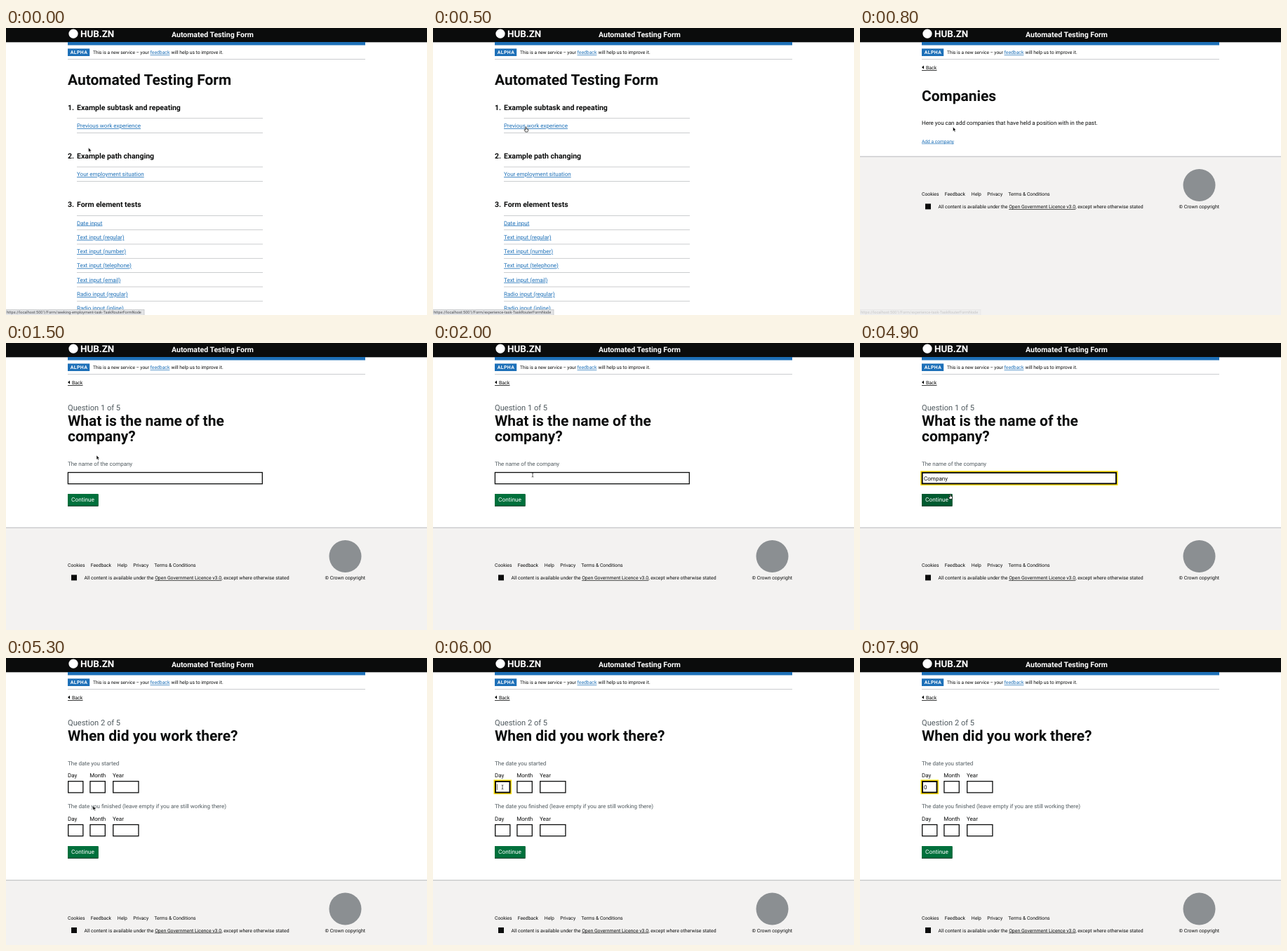
Animation, 600 px wide and 409 px high, one loop 8000 ms. Source, as an HTML page:

```html
<!DOCTYPE html>
<html lang="en">
<head>
<meta charset="utf-8">
<title>Form walkthrough</title>
<style>
html, body { margin: 0; width: 100%; height: 100%; overflow: hidden; background: #fff; }
svg { display: block; width: 100vw; height: 100vh; }
text { font-family: Roboto, "Open Sans", sans-serif; fill: #0b0c0c; text-rendering: geometricPrecision; white-space: pre; }
.b { font-weight: 700; }
.w { fill: #fff; }
.g { fill: #505a5f; }
.a { fill: #1d70b8; text-decoration: underline; text-decoration-thickness: .6px; }
.u { text-decoration: underline; text-decoration-thickness: .6px; }
.s { fill: #4a4c50; }
.alpha { letter-spacing: .4px; }
</style>
</head>
<body>
<svg id="stage" viewBox="0 0 600 409" xmlns="http://www.w3.org/2000/svg"></svg>
<script>
const LOOP = 8000, STEP = 100;
const H1 = 20.95, H2 = 10.5, BODY = 8.02, SMALL = 6.8;
const INK = '#0b0c0c', BLUE = '#1d70b8', LINE = '#bfc1c3';

const text = (x, y, size, str, cls = '', attrs = '') =>
  `<text x="${x}" y="${y}" font-size="${size}" class="${cls}" ${attrs}>${str}</text>`;
const rect = (x, y, w, h, fill, attrs = '') =>
  `<rect x="${x}" y="${y}" width="${w}" height="${h}" fill="${fill}" ${attrs}/>`;
const rule = (x, y, w) => rect(x, y, w, 0.8, LINE);
const group = (id, body) => `<g id="${id}">${body}</g>`;

const input = (x, y, w, h = 17.6) =>
  rect(x + 0.7, y + 0.7, w - 1.4, h - 1.4, '#fff', `stroke="${INK}" stroke-width="1.3"`);
const focusRing = (id, x, y, w, h = 17.6) => group(id,
  rect(x - 1.5, y - 1.5, w + 3, h + 3, '#ffdd00') +
  rect(x, y, w, h, INK) + rect(x + 2, y + 2, w - 4, h - 4, '#fff'));

const button = (id, y) =>
  rect(88, y + 1, 43.6, 16.8, '#002d18') +
  rect(88, y, 43.6, 16.8, '#00703c', `id="${id}"`) +
  text(93, y + 11.2, 8.3, 'Continue', 'w');

const back = () =>
  `<path d="M91 53.6V58.4L88 56Z" fill="${INK}"/>` +
  text(94, 58.5, 6.95, 'Back') + rect(88, 60, 21.5, 0.8, INK);

const footer = y =>
  rect(0, y, 600, 409 - y, '#f3f2f1') + rect(0, y - 0.3, 600, 0.9, '#b1b4b6') +
  [[88, 'Cookies'], [120.8, 'Feedback'], [158.8, 'Help'], [181.2, 'Privacy'], [211.2, 'Terms &amp; Conditions']]
    .map(([x, s]) => text(x, y + 56.4, SMALL, s)).join('') +
  rect(93, y + 67.4, 8, 8, INK) +
  text(111.5, y + 74, 6.88, 'All content is available under the <tspan class="u">Open Government Licence v3.0</tspan>, except where otherwise stated') +
  `<circle cx="483.5" cy="${y + 41}" r="23" fill="#8b8f92"/>` +
  text(512, y + 74, 6.95, '© Crown copyright', '', 'text-anchor="end"');

const section = (n, y, title) => text(88, y, H2, n + '.', 'b') + text(101, y, H2, title, 'b');
const question = (n, ...lines) =>
  text(88, 96, 11.1, `Question ${n} of 5`, 'g') +
  lines.map((s, i) => text(88, 118 + 22 * i, H1, s, 'b')).join('');

const header =
  rect(0, 0, 600, 20.3, INK) + rect(88, 20, 424, 4.5, BLUE) +
  '<circle cx="96" cy="8.2" r="6.6" fill="#fff"/>' +
  text(106, 13.2, 13.4, 'HUB.ZN', 'b w') +
  text(236, 13, 10.5, 'Automated Testing Form', 'b w') +
  rect(88, 29.4, 31.2, 10.6, BLUE) + text(91.8, 37.2, 6.9, 'ALPHA', 'b w alpha') +
  text(124, 37.3, 6.5, 'This is a new service – your') +
  text(205.5, 37.3, SMALL, 'feedback', 'a') +
  text(235.6, 37.3, 6.75, 'will help us to improve it.') +
  rule(88, 44.2, 424);

const tests = ['Date input', ...['regular', 'number', 'telephone', 'email'].map(k => `Text input (${k})`),
  ...['regular', 'inline'].map(k => `Radio input (${k})`)];

const home =
  text(88, 80.6, H1, 'Automated Testing Form', 'b') +
  section(1, 116.8, 'Example subtask and repeating') +
  rule(101, 128.3, 265) + text(101, 142, BODY, 'Previous work experience', 'a') + rule(101, 149, 265) +
  section(2, 186, 'Example path changing') +
  rule(101, 197.6, 265) + text(101, 211.2, BODY, 'Your employment situation', 'a') + rule(101, 218, 265) +
  section(3, 255.2, 'Form element tests') +
  tests.map((s, i) => rule(101, 267 + 20.3 * i, 265) + text(101, 280.5 + 20.3 * i, BODY, s, 'a')).join('');

const companies = back() +
  text(88, 103.6, H1, 'Companies', 'b') +
  text(88, 137.5, BODY, 'Here you can add companies that have held a position with in the past.') +
  text(88, 163.6, 6.65, 'Add a company', 'a') + footer(183);

const nameForm = back() + question(1, 'What is the name of the', 'company?') +
  text(88, 174.6, 7.95, 'The name of the company', 'g') +
  input(87.7, 183.8, 278.3) + focusRing('nameFocus', 87.7, 183.8, 278.3) +
  text(91, 195.6, 8.05, '', '', 'id="nameText"') +
  button('nameButton', 215) + footer(263);

const dateRow = y =>
  [[88, 22.5, 'Day'], [119.2, 22.8, 'Month'], [152, 37.6, 'Year']]
    .map(([x, w, s]) => text(x, y, BODY, s) + input(x, y + 5, w)).join('');
const dateForm = back() + question(2, 'When did you work there?') +
  text(88, 152.6, BODY, 'The date you started', 'g') + dateRow(170) +
  focusRing('dayFocus', 88, 175, 22.5) + text(91, 186.8, 8.05, '', '', 'id="dayText"') +
  text(88, 214.4, BODY, 'The date you finished (leave empty if you are still working there)', 'g') + dateRow(231.8) +
  button('dateButton', 268) + footer(316.6);

const status = (id, w, task) => group(id,
  rect(-1, 401.4, w + 1, 9, '#e3e4e6', 'stroke="#b4b6b8" stroke-width=".6"') +
  text(0.8, 407.4, 5.58, `https://localhost:5001/Form/${task}-task-TaskRouterFormNode`, 's'));

const pointers =
  group('arrow', '<path d="M0 0V6.2L1.4 4.9L2.4 7.2L3.4 6.8L2.4 4.6H4.3Z" fill="#000" stroke="#fff" stroke-width=".5"/>') +
  group('hand', '<path d="M-.6 .2Q0-.6 .6 .2V2.6L3 3.2V5.4L2.3 7H-.9L-2.4 4.2L-1.8 3.5L-.6 4.3Z" fill="#fff" stroke="#000" stroke-width=".7"/>') +
  group('beam', '<path d="M-1.3-3Q0-3 0-2Q0-3 1.3-3M0-2V2M-1.3 3Q0 3 0 2Q0 3 1.3 3" fill="none" stroke="#333" stroke-width=".8"/>');

document.getElementById('stage').innerHTML =
  rect(0, 0, 600, 409, '#fff') + header +
  group('home', home) + group('companies', companies) +
  group('nameForm', nameForm) + group('dateForm', dateForm) +
  status('statusA', 197, 'seeking-employment') + status('statusB', 172, 'experience') +
  rect(0, 0, 0.7, 8.4, '#333', 'id="caret"') + group('pointer', pointers);

const pages = [[0, 'home'], [700, 'companies'], [1500, 'nameForm'], [5200, 'dateForm']];
const typing = [[0, ''], [2700, 'C'], [2900, 'Co'], [3100, 'Com'], [3200, 'Comp'], [3400, 'Compa'], [3500, 'Compan'], [3700, 'Company']];
// time, x, y, pointer shape from then on
const path = [
  [0, 117.5, 170.5, 'arrow'], [100, 117.5, 170.5, 'arrow'], [400, 132.5, 141, 'hand'],
  [700, 132.5, 141, 'arrow'], [900, 132.5, 141, 'arrow'], [1300, 129, 160, 'hand'],
  [1500, 129, 160, 'arrow'], [1900, 142, 188, 'beam'], [2700, 142, 188, ''],
  [3900, 142, 188, 'beam'], [4100, 140, 195, 'beam'], [4300, 134, 208, 'arrow'],
  [4500, 128.6, 215.6, 'hand'], [5200, 128.6, 215.6, 'arrow'], [5600, 99, 184, 'beam'],
  [7000, 99, 184, ''], [LOOP, 99, 184, '']];

const el = id => document.getElementById(id);
const show = (id, on) => { el(id).style.display = on ? '' : 'none'; };
const at = (table, t) => table.filter(row => row[0] <= t).pop()[1];
const fade = (t, start, end) => Math.min(1, Math.max(0, (end - t) / (end - start)));
const ease = k => k * k * (3 - 2 * k);

function placePointer(t) {
  const i = path.findIndex(p => p[0] > t) - 1;
  const [t0, x0, y0, kind] = path[i], [t1, x1, y1] = path[i + 1];
  const k = ease((t - t0) / (t1 - t0));
  el('pointer').setAttribute('transform', `translate(${x0 + (x1 - x0) * k} ${y0 + (y1 - y0) * k})`);
  ['arrow', 'hand', 'beam'].forEach(id => show(id, id === kind));
}

function placeCaret(t, name) {
  const inName = t >= 2200 && t < 4600, inDay = t >= 5700;
  const typed = t >= 7000 ? 7000 : t >= 5700 ? 5700 : t >= 2700 ? Math.min(t, 3700) : 2200;
  show('caret', (inName || inDay) && (t - typed) % 1000 < 500);
  const field = el(inDay ? 'dayText' : 'nameText');
  const width = field.textContent ? field.getComputedTextLength() + 0.5 : 0;
  el('caret').setAttribute('transform', `translate(${91.2 + width} ${inDay ? 179.6 : 188.4})`);
}

function draw(ms) {
  const t = Math.floor(ms % LOOP / STEP) * STEP;
  const page = at(pages, t);
  pages.forEach(([, id]) => show(id, id === page));
  el('nameText').textContent = at(typing, t);
  el('dayText').textContent = t >= 7000 ? '0' : '';
  show('nameFocus', t >= 2200);
  show('dayFocus', t >= 5700);
  el('nameButton').setAttribute('fill', t >= 4500 ? '#005a30' : '#00703c');
  el('statusA').style.opacity = fade(t, 0, 200);
  el('statusB').style.opacity = t < 400 ? 0 : fade(t, 600, 870);
  placeCaret(t);
  placePointer(t);
}

const start = performance.now();
function tick(now) {
  draw(Math.max(0, now - start));
  requestAnimationFrame(tick);
}
draw(0);
requestAnimationFrame(tick);
</script>
</body>
</html>
```
